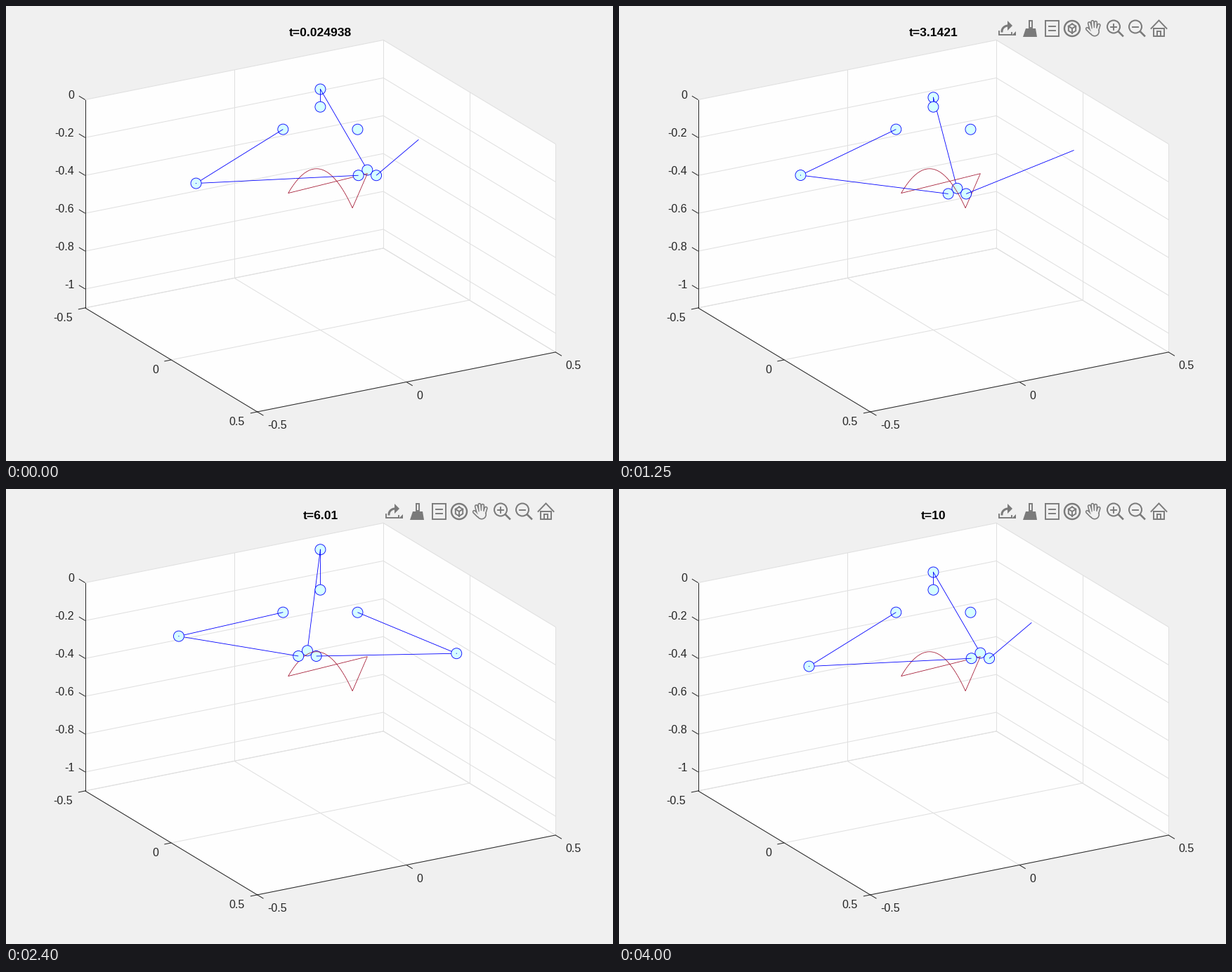
Animation, 864 px wide and 648 px high, one loop 4.05 s. Source, as a matplotlib script:

```python
import numpy as np
import matplotlib.pyplot as plt
from matplotlib.animation import FuncAnimation
from matplotlib.lines import Line2D
from matplotlib.patches import Circle, Polygon

W, H, DPI = 864, 648, 100
PX = 72 / DPI
FRAMES, INTERVAL, DURATION, STEPS = 81, 50, 10, 401
BASE_R, TOOL_R, UPPER, LOWER = 0.125, 0.03, 0.35, 0.5
ANGLES = np.radians([-90, 30, 150])
LO, HI, FLOOR = -0.5, 0.5, -1.1
START = np.array([0.1, 0.1, -0.25])
LOW_A = np.array([0.1, 0.05, -0.416])
LOW_B = LOW_A * (-1, -1, 1)
RISE = 0.166
BG, INK, GRID, ICON = "#f0f0f0", "#262626", "#dfdfdf", "#7a7a7a"
BLUE, FACE, RED = "#0000ff", "#d6ffff", "#a2142f"

plt.rcParams["font.family"] = "Liberation Sans"
fig = plt.figure(figsize=(W / DPI, H / DPI), dpi=DPI, facecolor=BG)
ax = fig.add_axes([0, 0, 1, 1])
ax.set_xlim(0, W)
ax.set_ylim(H, 0)
ax.axis("off")


def project(p):
    x, y, z = p
    return np.array([447.4 + 245 * x + 424.5 * y,
                     165 + 148 * x - 85 * y - 269.5 * z])


def depth(p):
    """Nearness to the viewer, used as the drawing order."""
    return 398 * p[0] - 230 * p[1] + 100 * p[2]


def stroke(pts, color, width=1.0, z=0.0, cap="butt"):
    xs, ys = zip(*pts)
    return ax.add_line(Line2D(xs, ys, color=color, lw=width * PX, zorder=z,
                              solid_capstyle=cap, solid_joinstyle="miter"))


def disc(center, r, face, line, width, z):
    return ax.add_patch(Circle(center, r, fc=face, ec=line, lw=width * PX,
                               zorder=z))


def edge(a, b, color=GRID, z=-900):
    stroke([project(a), project(b)], color, 1, z, "projecting")


def tick(p, offset, text, shift, ha):
    x, y = q = project(p)
    stroke([q, q + offset], INK, 1, -800)
    ax.text(x + shift[0], y + shift[1], text, ha=ha, va="baseline",
            fontsize=16 * PX, color=INK)


def draw_box():
    top_left, back, right = (LO, LO, 0), (LO, HI, 0), (HI, HI, 0)
    corner, left, far = (HI, LO, FLOOR), (LO, LO, FLOOR), (HI, HI, FLOOR)
    hull = [project(p) for p in (top_left, back, right, far, corner, left)]
    ax.add_patch(Polygon(hull, fc="#fefefe", ec="none", zorder=-1000))

    levels = np.arange(0, -6, -1) / 5
    for z in [*levels, FLOOR]:
        edge((LO, LO, z), (LO, HI, z))
        edge((LO, HI, z), (HI, HI, z))
    for v in (LO, 0, HI):
        edge((v, HI, 0), (v, HI, FLOOR))
        edge((v, LO, FLOOR), (v, HI, FLOOR))
        edge((LO, v, 0), (LO, v, FLOOR))
        edge((LO, v, FLOOR), (HI, v, FLOOR))
    for a, b in ((top_left, left), (left, corner), (corner, far)):
        edge(a, b, INK, -800)

    along_x, along_y = np.array([8.8, 5.3]), np.array([9.8, -2])
    for z in levels:
        tick((LO, LO, z), -along_x, f"{z:g}", (-15.5, -1.1), "right")
    for v in (LO, 0, HI):
        tick((v, LO, FLOOR), -along_y, f"{v:g}", (-17.6, 19), "right")
        tick((HI, v, FLOOR), along_x, f"{v:g}", (14.2, 24.3), "left")


def draw_toolbar():
    parts = []

    def pen(*pts, width=1.9, color=ICON, cap="projecting"):
        parts.append(stroke(pts, color, width, 1000, cap))

    def rect(x, y, w, h):
        pen((x, y), (x + w, y), (x + w, y + h), (x, y + h), (x, y))

    def fill(*pts):
        parts.append(ax.add_patch(Polygon(pts, fc=ICON, ec="none", zorder=1000)))

    def ring(x, y, r, width=2.0):
        parts.append(disc((x, y), r, "none", ICON, width, 1000))

    # export: tray, bent arrow, menu corner
    pen((541, 36), (541, 41), (559, 41), (559, 38))
    bend = np.linspace(0, np.pi / 2, 9)
    pen(*zip(554 - 9 * np.cos(bend), 36 - 8 * np.sin(bend)), width=3)
    fill((553, 21), (560, 28), (553, 35))
    fill((559, 42), (565, 42), (565, 36))
    # brush
    rect(584, 21, 4, 10)
    fill((579, 32), (593, 32), (595, 44), (575, 44))
    # data tip
    rect(607, 21, 19, 22)
    for y in (29, 35):
        pen((612, y), (621, y))
    # rotate: cube in a ring
    ring(645, 32, 11, 2.4)
    turn = np.arange(7) * np.pi / 3
    cube = list(zip(645 + 6 * np.sin(turn), 32 - 6.5 * np.cos(turn)))
    pen(*cube)
    for p in cube[1::2]:
        pen((645, 32), p)
    # pan: a wide hand, then a narrower one to leave its outline
    for color, shrink in ((ICON, 0), (BG, 3.2)):
        for k in range(4):
            tip = 22.5 + 1.5 * (k - 1.2) ** 2
            pen((669.5 + 4.5 * k, tip), (672 + 3 * k, 34), color=color,
                width=5.4 - shrink, cap="round")
        pen((666.5, 32.5), (672, 38), color=color, width=5.4 - shrink, cap="round")
        parts.append(disc((677, 36.5), 7 - shrink / 2, color, "none", 0, 1000))
    # zoom in and out
    for x in (704, 735):
        ring(x, 29.5, 9)
        pen((x + 7, 36.5), (x + 13, 42.5), width=2.6)
        pen((x - 4, 29.5), (x + 4, 29.5))
    pen((704, 25.5), (704, 33.5))
    # home
    pen((757.5, 32), (768.5, 20.5), (779.5, 32))
    rect(761, 32, 15, 11)
    rect(766, 36, 5, 7)
    return parts


def arc(s):
    return LOW_A + (LOW_B - LOW_A) * s + np.array([0, 0, 4 * RISE * s * (1 - s)])


def tool_pos(t):
    """Speed up along a line, follow the arc evenly, slow down on the way back."""
    if t < 2.5:
        return START + (LOW_A - START) * (t / 2.5) ** 2
    if t < 7.5:
        return arc((t - 2.5) / 5)
    return START + (LOW_B - START) * ((DURATION - t) / 2.5) ** 2


def draw_path():
    pts = [tool_pos(t) for t in np.linspace(0, DURATION, 81)]
    for a, b in zip(pts, pts[1:]):
        stroke([project(a), project(b)], RED, 0.8, depth((a + b) / 2))


def arm(c, phi):
    """Base joint, elbow and tool joint of one arm."""
    d = np.array([np.cos(phi), np.sin(phi), 0])
    u = c @ d + TOOL_R - BASE_R
    v = c[1] * d[0] - c[0] * d[1]
    w = -c[2]
    k = (u * u + v * v + w * w + UPPER ** 2 - LOWER ** 2) / (2 * UPPER)
    th = np.arctan2(w, u) - np.arccos(k / np.hypot(u, w))
    elbow = d * (BASE_R + UPPER * np.cos(th))
    elbow[2] = -UPPER * np.sin(th)
    return BASE_R * d, elbow, c + TOOL_R * d


def clip_top(a, b):
    """Keep the part of a segment below the ceiling z = 0."""
    if max(a[2], b[2]) <= 0:
        return a, b
    if min(a[2], b[2]) >= 0:
        return None
    cut = a + (b - a) * a[2] / (a[2] - b[2])
    return (cut, b) if a[2] > 0 else (a, cut)


def rod(a, b, levels):
    """Split a rod at the joints' depths so that it sorts against them."""
    da, db = depth(a), depth(b)
    cuts = [(z - da) / (db - da) for z in levels]
    cuts = [0] + sorted(s for s in cuts if 0.001 < s < 0.999) + [1]
    pts = [a + (b - a) * s for s in cuts]
    return [stroke([project(p), project(q)], BLUE, 0.85, depth((p + q) / 2))
            for p, q in zip(pts, pts[1:])]


draw_box()
draw_path()
toolbar = draw_toolbar()
title = ax.text(447.5, 42.7, "", ha="center", va="baseline",
                fontsize=17.5 * PX, fontweight="bold", color="black")
moving = []


def update(i):
    while moving:
        moving.pop().remove()
    t = (1 + 5 * i) * DURATION / STEPS
    title.set_text(f"t={t:.5g}")
    for part in toolbar:
        part.set_visible(i > 0)
    arms = [arm(tool_pos(t), phi) for phi in ANGLES]
    joints = [p for a in arms for p in a if p[2] <= 0]
    levels = [depth(p) for p in joints]
    for p, z in zip(joints, levels):
        moving.append(disc(project(p), 7.5, FACE, BLUE, 0.85, z))
    for base, elbow, tip in arms:
        for ends in (clip_top(base, elbow), clip_top(elbow, tip)):
            if ends:
                moving.extend(rod(*ends, levels))
        if elbow[2] <= 0:
            moving.append(disc(project(elbow), 0.6, BLUE, "none", 0,
                               depth(elbow) + 0.01))
    return []


anim = FuncAnimation(fig, update, frames=FRAMES, interval=INTERVAL,
                     init_func=lambda: update(0), repeat=True, repeat_delay=0,
                     blit=False)
plt.show()
```
